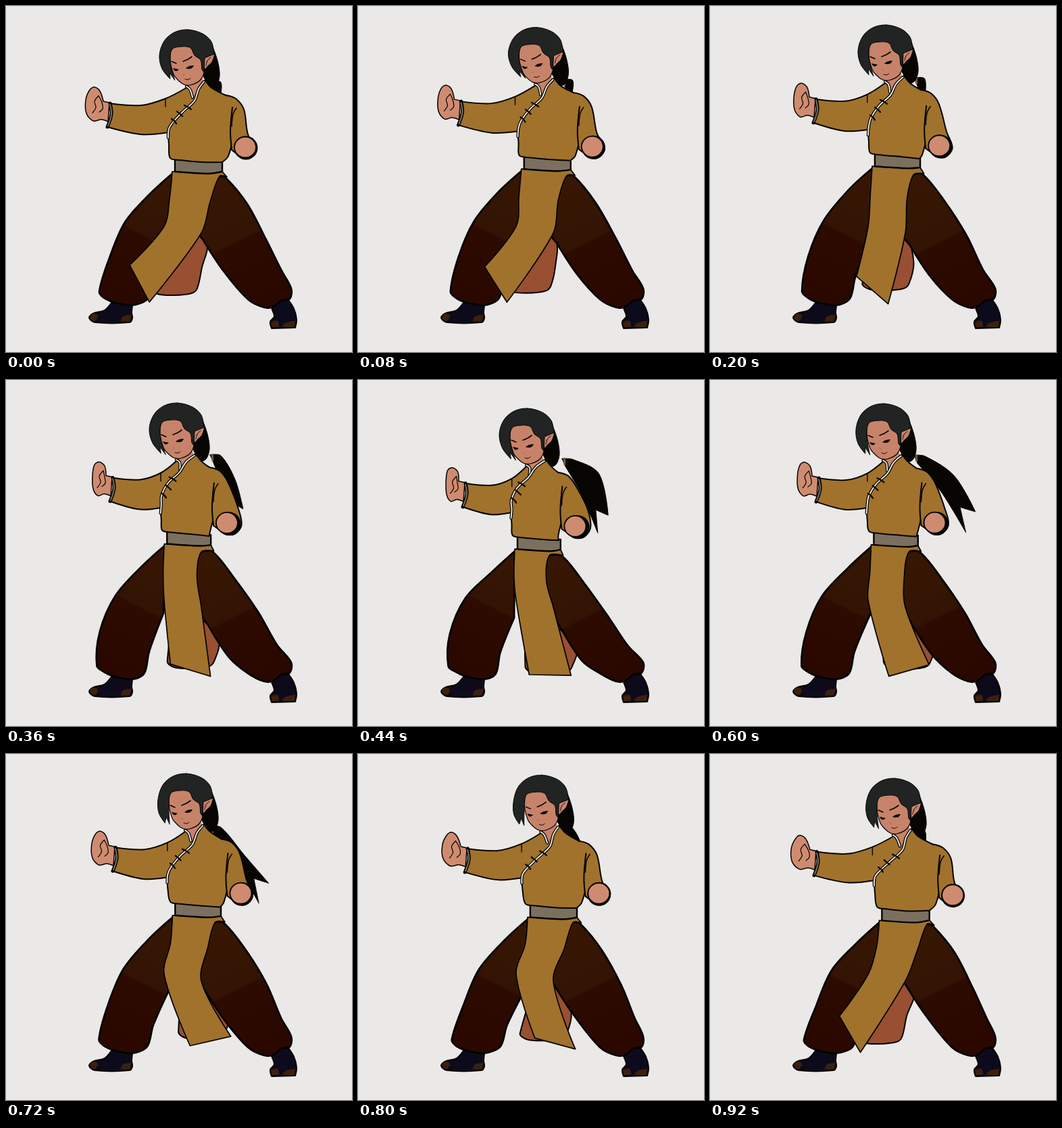
Animation, 512 px wide and 512 px high, one loop 960 ms. Source, as an HTML page with a canvas:

```html
<!DOCTYPE html>
<html lang="en">
<head>
<meta charset="utf-8">
<title>Martial stance</title>
<style>
html, body { margin: 0; width: 100%; height: 100%; overflow: hidden; background: #eae9e7; }
canvas { display: block; }
</style>
</head>
<body>
<canvas id="stage" width="512" height="512"></canvas>
<script>
const ctx = document.getElementById('stage').getContext('2d');
const LOOP = 960, STEP = 40;
const INK = '#030202', GOLD = '#a1722c', SKIN = '#cf8b6f', FACE = '#c7836a',
  HAIR = '#212423', TAIL = '#070502', SASH = '#7b705f', TRIM = '#eceae6';

// Four motions drive the whole figure: px, px, px and degrees
const KEYS = [0, 200, 360, 440, 600, 720, 920];
const MOTION = {
  sway: [0, -8, -15, -18, -11, -2, 4],
  bounce: [0, -7, -1, 7, 0, -6, 1],
  reach: [0, 3, 4, 5, 7, 8, 4],
  swing: [62, 41, 17, 1, -16, -13, 60]
};

// How far each body part follows: x = sway, reach; y = bounce, sway
const RIG = {
  H: [1, 0, 1, 0],         // head
  T: [.7, -.8, 1, -.1],    // fringe tips
  N: [.95, 0, 1, -.05],    // collar
  C: [1.5, 0, 1, .15],     // chest
  S: [.75, 0, .8, -.2],    // side
  L: [.6, .5, 1, -.1],     // far shoulder
  A: [0, 1, 1, -.1],       // wrist
  B: [-.4, 1, 1, -.2],     // open hand
  R: [1.5, -.4, 1, .12],   // near shoulder
  E: [1, 0, .5, .1],       // elbow
  F: [1.7, -.4, .55, -.2], // fist
  K: [1.4, -.4, .5, -.25], // cuff
  W: [.85, .25, 1, .1],    // waist
  G: [.95, 0, .4, 0],      // knees
  J: [-.6, 0, .2, -1.3],   // inner thigh
  O: [0, 0, 0, 0]          // ground
};

// Smooth periodic curve through the values of one motion
function curve(values, t) {
  const n = KEYS.length;
  const value = j => values[(j + n) % n];
  const time = j => KEYS[(j + n) % n] + Math.floor(j / n) * LOOP;
  const rate = j => (value(j + 1) - value(j)) / (time(j + 1) - time(j));
  const slope = j => {
    const a = time(j) - time(j - 1), b = time(j + 1) - time(j);
    return (rate(j - 1) * b + rate(j) * a) / (a + b);
  };
  const i = KEYS.findLastIndex(k => k <= t);
  const h = time(i + 1) - time(i), u = (t - time(i)) / h, v = 1 - u;
  return value(i) * v * v * (1 + 2 * u) + value(i + 1) * u * u * (3 - 2 * u)
    + h * u * v * (slope(i) * v - slope(i + 1) * u);
}

const now = {};

// "W246 248*": parts to follow (averaged), x, y, star for a corner
function rig(s) {
  return [...s.matchAll(/([A-Z]*)(\d+) (\d+)(\*?)/g)].map(([, tags, x, y, star]) => {
    const p = { x: +x, y: +y, corner: !!star };
    for (const tag of tags) {
      const [sx, rx, by, sy] = RIG[tag];
      p.x += (sx * now.sway + rx * now.reach) / tags.length;
      p.y += (by * now.bounce + sy * now.sway) / tags.length;
    }
    return p;
  });
}

// Point at a distance from p; 0 degrees hangs straight down, positive to the right
function hang(p, deg, r, corner = true) {
  const a = deg * Math.PI / 180;
  return { x: p.x + r * Math.sin(a), y: p.y + r * Math.cos(a), corner };
}

function trace(pts, closed) {
  const n = pts.length;
  const get = i => pts[(i + n) % n];
  const dist = (a, b) => Math.hypot(a.x - b.x, a.y - b.y);
  const arm = (i, len) => {
    const p = get(i), a = get(i - 1), b = get(i + 1);
    const end = !closed && (i === 0 || i === n - 1);
    const k = p.corner || end ? 0 : len / 3 / (dist(a, p) + dist(p, b) || 1);
    return [(b.x - a.x) * k, (b.y - a.y) * k];
  };
  ctx.beginPath();
  ctx.moveTo(pts[0].x, pts[0].y);
  for (let i = 0; i < (closed ? n : n - 1); i++) {
    const p = get(i), q = get(i + 1), len = dist(p, q);
    const [ax, ay] = arm(i, len), [bx, by] = arm((i + 1) % n, len);
    ctx.bezierCurveTo(p.x + ax, p.y + ay, q.x - bx, q.y - by, q.x, q.y);
  }
  if (closed) ctx.closePath();
}

function paint(fill, width, ink = INK) {
  if (fill) { ctx.fillStyle = fill; ctx.fill(); }
  if (width) { ctx.lineWidth = width; ctx.strokeStyle = ink; ctx.stroke(); }
}

const asPoints = p => typeof p === 'string' ? rig(p) : p;
function shape(p, fill, width = 0) { trace(asPoints(p), true); paint(fill, width); }
function line(p, width, ink) { trace(asPoints(p), false); paint(null, width, ink); }
function disc(p, rx, ry, fill, width) {
  const [c] = rig(p);
  ctx.beginPath();
  ctx.ellipse(c.x, c.y, rx, ry, 0, 0, 7);
  paint(fill, width);
}

// Trouser cloth darkens below a slanted edge
function cloth(x, y, lean) {
  const g = ctx.createLinearGradient(x - lean * 40, y - 80, x + lean * 40, y + 80);
  g.addColorStop(0, '#371703');
  g.addColorStop(.49, '#331303');
  g.addColorStop(.51, '#2d0b01');
  g.addColorStop(1, '#2a0800');
  return g;
}
const CLOTH_L = cloth(205, 340, -1), CLOTH_R = cloth(340, 350, 1);

function ponytail() {
  const root = { x: 304, y: 115 + .7 * now.bounce };
  const deg = 33 - .5 * now.swing, len = 112 - .9 * now.swing;
  const bow = 24 + 2 * now.bounce;
  shape([
    hang(root, 210, 4),
    hang(root, 100, 14, false),
    hang(root, deg + bow, len * .5, false),
    hang(root, deg + 7, len - 7),
    hang(root, deg + 1, len * .78),
    hang(root, deg - 7, len + 7),
    hang(root, deg - 4, len * .5, false),
    hang(root, 20, 9)
  ], TAIL, 1);
  line([hang(root, 160, 4), hang(root, 20, 5)], 3, '#75593a');
}

function shoes() {
  const navy = '#0d0a1b', brown = '#3b200d';
  shape('156 439* 187 443* 186 454 187 462 183 468 131 468 123 461 129 455 146 450', navy, 2);
  shape('124 459 130 455 136 458 132 466 126 464', brown);
  shape('170 466 174 459 186 457* 183 467*', brown);
  shape('395 437* 418 435* 426 448 430 464 428 476* 393 477* 391 467 397 459 393 446', navy, 2);
  shape('393 468 402 466 404 475* 393 475*', brown);
  shape('409 473 416 468 428 466* 427 475* 410 475*', brown);
}

function backFlap() {
  const x = 283 - .55 * now.swing, y = 422 + now.bounce;
  const edge = (dx, dy) => ({ x: x + dx, y: y + dy });
  shape([...rig('W268 335'), edge(-35, -5), edge(-25, 4), edge(0, 6), edge(26, 3), edge(34, -4),
    edge(41, -35), ...rig('W297 352')], '#994f31', 2);
}

function trousers() {
  shape('W246 248* W212 279 G176 320 G153 373 GOOO138 423 145 432 158 438 175 442 192 442 '
    + 'GOO210 433 GO219 402 W245 347*', CLOTH_L, 2.8);
  shape('F316 252* WF325 254 WF357 293 W385 346 GO408 392 422 418 420 433 407 436 396 445 382 446 '
    + '358 434 J321 391 J291 345* 272 325* 268 275*', CLOTH_R, 2.8);
}

function skirt() {
  const s = now.swing;
  const [waist] = rig('W283 250');
  const hem = hang(waist, 5 - .16 * s - .006 * s * s, 182);
  shape([...rig('W246 245* WWF320 245* WF327 253* F316 252 WF302 290 289 336'),
    hang(hem, 90 - s, 31), hang(hem, 270 - s, 31),
    ...rig('234 326 WL242 285')], GOLD, 1.7);
  shape('W250 226* W285 230 WWF320 230* WWF320 245* W300 248 W250 245*', SASH, 2.4);
}

function openHand() {
  shape('AB131 120 AB139 126 A144 141* A153 143* A151 171* A141 168 AB129 170 B119 159 B118 139 AB124 124', SKIN, 1.5);
  line('AB137 133 AB131 141 AB133 150 AB128 158', 1.2);
  line('AB137 133 A142 143 A143 152 A138 157', 1.2);
}

function torso() {
  openHand();
  shape('N295 110* N304 121 R325 132* R342 150 F338 185 F329 222 WF320 231* W290 231 W258 228 '
    + 'W243 225 S241 205 S240 187* AS200 190 A150 179* A155 161 A153 144* AL200 147 L236 137 H267 121*', GOLD, 2);
  line('A154 144 A156 160 A150 179', 5);
  line('A154 146 A156 160 A151 177', 2, SASH);
  line('L236 137 L236 149', 1.4);

  trace(rig('R325 132* R340 137 R352 153 E358 190 K371 212 K357 226 F334 213* F332 185 F335 150*'), false);
  paint(GOLD, 2);
  line('F341 151 F336 160 F334 178', 1.5);
  disc('FK355 210', 17.5, 17.5, INK);
  disc('F354 209', 16, 15.5, SKIN, 1.8);
}

function collar() {
  shape('H266 112* CH277 134* N292 111* H288 100*', FACE);
  const left = 'H267 119 H272 123 CH276 135';
  const right = 'N293 112 CN285 123 C279 140 C262 156 CS247 172 S241 182 S240 195';
  for (const edge of [left, right]) {
    line(edge, 4.4);
    line(edge, 1.9, TRIM);
  }
  line('C264 147 C270 150 C274 153', 2.2);
  line('CS253 156 CS258 160 CS261 163', 2.2);
  line('CSS245 167 CSS249 170 CSS252 174', 2.2);
}

function head() {
  shape('H246 62 H243 80 H248 101 H254 109 H263 116 H273 117 H288 109 H294 92 H292 64 H268 52', FACE, 1.2);
  shape('H292 78 H299 73 H309 71* H305 83 H299 89 H294 95*', FACE, 1.4);
  line('H303 76 H298 81 H296 88', 1);
  shape('H269 35 H249 39 H234 52 H227 73 HT231 93 T243 108* HT242 99* T250 110* H243 83 H246 64 '
    + 'H260 60 H273 62 H279 73 H288 80 H290 94 H293 98* H294 77* H308 71* H304 53 H291 41', HAIR, 1);
  line('H245 82 H252 85', 1.4);
  line('H262 82 H269 79 H275 75', 1.6);
  shape('H247 92* H252 93 H256 94* H253 96 H250 96', INK);
  shape('H266 92* H271 89 H278 88* H275 92 H270 93', INK);
  line('H265 108 H269 109 H273 107', 1);
  line('H262 101 H264 102', .9, '#8e573f');
}

function draw() {
  ctx.fillStyle = '#eae9e7';
  ctx.fillRect(0, 0, 512, 512);
  ponytail();
  shape('H300 50 H308 66 H314 85 H316 104 H311 118 H303 121 H295 110 H288 90', TAIL, 1);
  shoes();
  backFlap();
  trousers();
  skirt();
  torso();
  collar();
  head();
}

ctx.lineJoin = ctx.lineCap = 'round';
const start = performance.now();
function tick() {
  const t = Math.max(0, performance.now() - start) % LOOP;
  const step = Math.floor(t / STEP) * STEP;
  for (const name in MOTION) now[name] = curve(MOTION[name], step);
  draw();
  requestAnimationFrame(tick);
}
tick();
</script>
</body>
</html>
```
